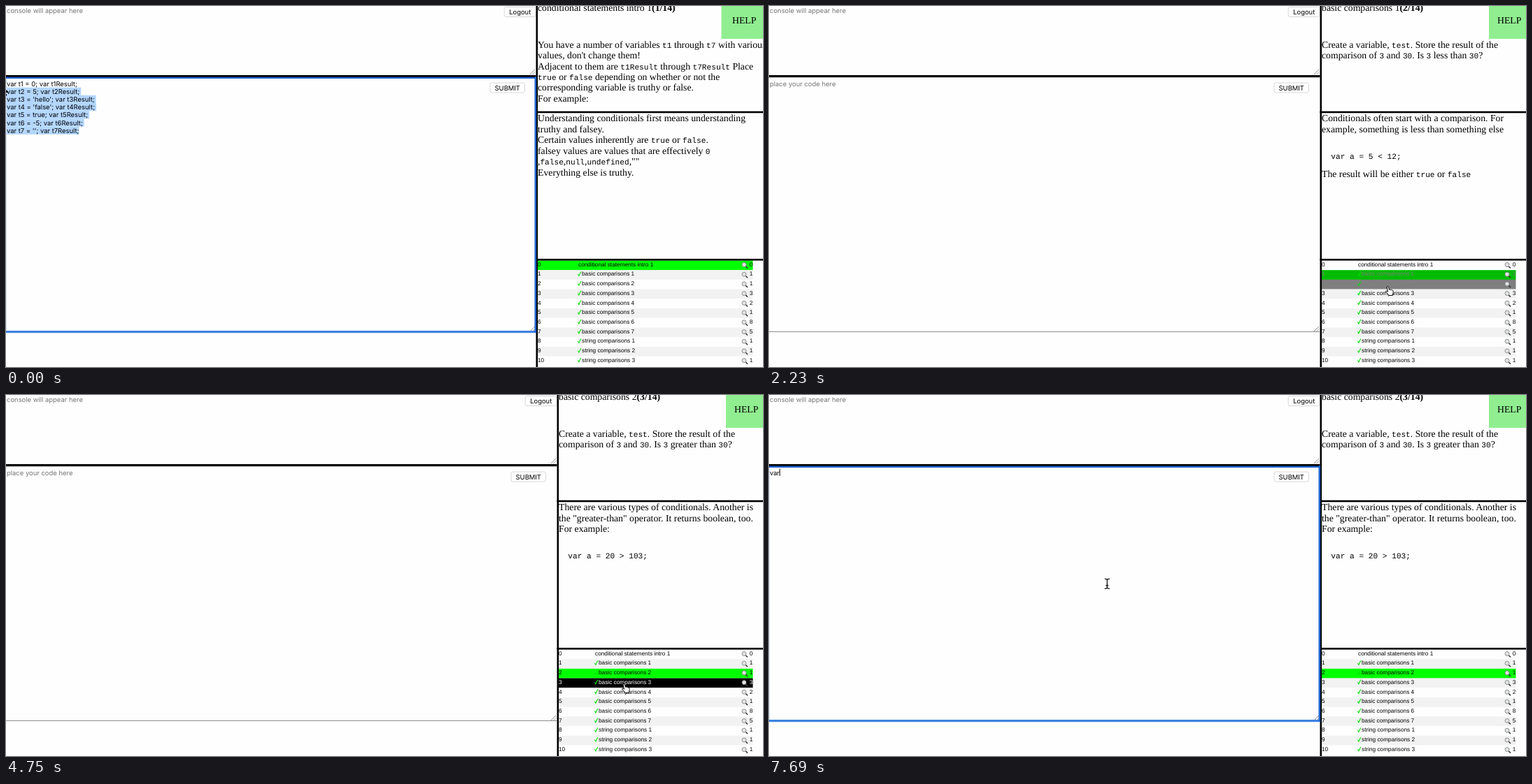
These frames come from a looping animation (1082x517 px, 7990 ms). An HTML page with a canvas:

```html
<!DOCTYPE html>
<html lang="en">
<head>
<meta charset="utf-8">
<title>Code lessons</title>
<style>
html, body { margin: 0; width: 100%; height: 100%; overflow: hidden; background: #fefefe; }
canvas { display: block; width: 1082px; height: 517px; }
</style>
</head>
<body>
<canvas width="1082" height="517"></canvas>
<script>
const ctx = document.querySelector('canvas').getContext('2d');
const LOOP = 7990;
const UI = '9.45px Inter, sans-serif';
const SERIF = '13.75px "Liberation Serif", serif';
const BOLD = 'bold ' + SERIF;
const MONO = '11.15px "Liberation Mono", monospace';
const SANS = '8.25px "Liberation Sans", sans-serif';
const PAPER = '#fefefe';

// Moments at which the screen refreshes
const TICKS = [0, 150, 300, 750, 890, 1040, 1190, 1340, 1490, 1640, 1780, 1930, 2080, 2230, 2380, 2520,
  2820, 2960, 3110, 3550, 3700, 4300, 4450, 4600, 4750, 4900, 5050, 5190,
  5480, 5630, 5780, 5930, 6070, 6220, 6360, 6510, 6660, 6800, 7250, 7390, 7690];

const CODE = [
  'var t1 = 0; var t1Result;', 'var t2 = 5; var t2Result;',
  "var t3 = 'hello'; var t3Result;", "var t4 = 'false'; var t4Result;",
  'var t5 = true; var t5Result;', 'var t6 = -5; var t6Result;', "var t7 = ''; var t7Result;"
];

// Backticks switch to monospace; "code" lines are indented listings
const PAGES = [
  { title: 'conditional statements intro 1', step: '(1/14)',
    task: ['You have a number of variables `t1` through `t7` with various', "values, don't change them!",
      'Adjacent to them are `t1Result` through `t7Result` Place',
      '`true` or `false` depending on whether or not the',
      'corresponding variable is truthy or false.', 'For example:'],
    notes: ['Understanding conditionals first means understanding', 'truthy and falsey.',
      'Certain values inherently are `true` or `false`.',
      'falsey values are values that are effectively `0`',
      ',`false`,`null`,`undefined`,""', 'Everything else is truthy.'] },
  { title: 'basic comparisons 1', step: '(2/14)',
    task: ['Create a variable, `test`. Store the result of the',
      'comparison of `3` and `30`. Is `3` less than `30`?'],
    notes: ['Conditionals often start with a comparison. For', 'example, something is less than something else'],
    code: ['var a = 5 < 12;'], codeY: 219, after: 'The result will be either `true` or `false`' },
  { title: 'basic comparisons 2', step: '(3/14)',
    task: ['Create a variable, `test`. Store the result of the',
      'comparison of `3` and `30`. Is `3` greater than `30`?'],
    notes: ['There are various types of conditionals. Another is',
      'the "greater-than" operator. It returns boolean, too.', 'For example:'],
    code: ['var a = 20 > 103;'], codeY: 234.3 },
  { title: 'basic comparisons 3', step: '(4/14)',
    task: ['Create a variable, `test`. Store the result of the',
      'comparison of `12` and `4`. Is `12` greater than or equal to', '`4`?'],
    notes: ['Sometimes it is necessary to see if something is less', 'or equal to, or greater than or equal to'],
    code: ['var a = 40 <= 40; //true', 'var b = 30 >= 29; //true', 'var c = 30 <= -2; //false'], codeY: 219 }
];
const PAGE_AT = [[0, 0], [1930, 1], [2820, 2], [4900, 3], [6070, 2]];

const COUNTS = [0, 1, 1, 3, 2, 1, 8, 5, 1, 1, 1];
const lessonName = i => i === 0 ? PAGES[0].title
  : i < 8 ? `basic comparisons ${i}` : `string comparisons ${i - 7}`;

// Row looks as [r, g, b, text grey]; each change fades over FADE ms
const FADE = 300;
const LOOK = { hover: [0, 0, 0, 255], active: [0, 255, 0, 0], both: [0, 128, 0, 255] };
const ROW_STATES = {
  0: [[-999, 'active'], [1800, 'rest']],
  1: [[-999, 'rest'], [1409, 'hover'], [1800, 'both'], [2080, 'active'], [2740, 'rest']],
  2: [[-999, 'rest'], [1110, 'hover'], [1409, 'rest'], [2080, 'hover'], [2740, 'both'], [4260, 'active'],
    [4850, 'rest'], [5585, 'hover'], [6010, 'both'], [6440, 'active']],
  3: [[-999, 'rest'], [4260, 'hover'], [4850, 'both'], [5585, 'active'], [6010, 'rest']]
};

const POINTER = [
  [0, 'arrow', -5.5, 114.5], [150, 'beam', 560, 266], [750, 'beam', 600, 285], [890, 'beam', 685, 325],
  [1040, 'beam', 775, 350], [1190, 'hand', 850, 396], [1340, 'hand', 878, 395], [1490, 'hand', 887, 387],
  [1640, 'hand', 888, 383], [1930, 'hand', 888, 385], [2080, 'hand', 883, 396], [2230, 'hand', 880.5, 401],
  [3550, 'hand', 880, 403], [3700, 'hand', 879.5, 405], [4300, 'hand', 879.5, 408], [4450, 'hand', 879.5, 411],
  [4600, 'hand', 879.5, 413], [5480, 'hand', 880, 409], [5630, 'hand', 880, 400], [5780, 'hand', 880, 397.5],
  [6360, 'hand', 872, 395], [6510, 'beam', 483.3, 270.3]
];
const HAND = new Path2D('M2.6 1.6C2.8.4 4.4.3 4.8 1.5L6 5.4C6.6 4.7 7.9 4.9 8.2 5.7 8.8 5.1 9.8 5.4 10 6.1 ' +
  '10.8 5.8 11.5 6.3 11.6 7.2 12 9 11.4 10.5 11 11.5L10.8 13.5H5.6C5 12 3.4 10.8 1.6 9 .3 7.8 1.4 6.6 2.6 7.3L4 8.4Z');
const BEAM = new Path2D('M-3.5-7Q0-7 0-5.5 0-7 3.5-7M0-5.5V5.5M-3.5 7Q0 7 0 5.5 0 7 3.5 7M-2 2.5H2');
const ARROW = new Path2D('M0 0V13L3 10.2 5 14.5 7 13.5 5 9.4H9.4Z');
const CHECK = new Path2D('M.4 4.6L1.9 7 4.8 1');

const latest = (table, t) => table.filter(row => row[0] <= t).pop();
const within = (t, from, to) => t >= from && t < to;

function box(color, x, y, w, h) {
  ctx.fillStyle = color;
  ctx.fillRect(x, y, w, h);
}

function text(str, x, y, font, color = '#000', align = 'left') {
  ctx.font = font;
  ctx.fillStyle = color;
  ctx.textAlign = align;
  ctx.fillText(str, x, y);
  return ctx.measureText(str).width;
}

function line(color, width, ...points) {
  ctx.strokeStyle = color;
  ctx.lineWidth = width;
  ctx.beginPath();
  points.forEach(([x, y]) => ctx.lineTo(x, y));
  ctx.stroke();
}

function rich(str, x, y) {
  str.split('`').forEach((part, i) => { x += text(part, x, y, i % 2 ? MONO : SERIF); });
}

function at(x, y, draw) {
  ctx.save();
  ctx.translate(x, y);
  draw();
  ctx.restore();
}

function button(label, x, y, w) {
  ctx.beginPath();
  ctx.roundRect(x, y, w, 14, 2.5);
  ctx.fillStyle = '#fff';
  ctx.fill();
  ctx.strokeStyle = '#d4d4d4';
  ctx.lineWidth = 0.9;
  ctx.stroke();
  text(label, x + w / 2, y + 10.6, UI, '#000', 'center');
}

function grip(x, y) {
  line('#777', 0.8, [x - 7, y], [x, y - 7]);
  line('#777', 0.8, [x - 3.5, y], [x, y - 3.5]);
}

function rowLook(i, t) {
  const shade = i % 2 ? 242 : 254;
  const look = name => LOOK[name] || [shade, shade, shade, 0];
  let [start, name] = [-999, 'rest'], from = look('rest');
  const blend = now => {
    const p = Math.min(1, (now - start) / FADE);
    return look(name).map((v, k) => from[k] + (v - from[k]) * p);
  };
  for (const [time, next] of ROW_STATES[i] || []) {
    if (time > t) break;
    from = blend(time);
    [start, name] = [time, next];
  }
  return blend(t).map(Math.round);
}

function magnifier(x, y) {
  line('#333', 1.5, [x + 2.2, y + 2.2], [x + 5, y + 5]);
  ctx.beginPath();
  ctx.arc(x, y, 3, 0, 7);
  ctx.fillStyle = '#dfe3e6';
  ctx.fill();
  ctx.strokeStyle = '#888';
  ctx.lineWidth = 0.9;
  ctx.stroke();
}

function lessonRow(i, t, left, nameX) {
  const top = 364.5 + 13.72 * i, base = top + 8.2;
  const [r, g, b, grey] = rowLook(i, t);
  const ink = `rgb(${grey},${grey},${grey})`;
  box(`rgb(${r},${g},${b})`, left, top, 1067.5 - left, 13.72);
  text(i, left, base, SANS, ink);
  if (i) at(nameX - 1, base - 7, () => {
    ctx.strokeStyle = '#00e000';
    ctx.lineWidth = 1.1;
    ctx.stroke(CHECK);
  });
  text(lessonName(i), i ? nameX + 5 : nameX, base, SANS, ink);
  magnifier(1055, top + 6);
  text(COUNTS[i], 1067.3, base, SANS, ink, 'right');
}

function lessonPane(t, page, wide) {
  const left = wide ? 790 : 760;
  text(page.step, left + text(page.title, left, 6.5, SERIF), 6.5, BOLD);
  box('#90ee90', wide ? 1029 : 1022.5, 0, 60, 47);
  text('HELP', wide ? 1041 : 1038, 25, SERIF);
  page.task.forEach((str, i) => rich(str, left, 59.6 + 15.45 * i));
  page.notes.forEach((str, i) => rich(str, left, 165.3 + 15.45 * i));
  (page.code || []).forEach((str, i) => text(str, left + 13.3, page.codeY + 12.9 * i, MONO));
  if (page.after) rich(page.after, left, 244.5);
  COUNTS.forEach((_, i) => lessonRow(i, t, left, wide ? 842 : 818));
  box('#000', left - 2.5, 150.7, 330, 2.6);
  box('#000', left - 2.5, 362, 330, 2.6);
}

function editorText(t, wide) {
  if (!wide) {
    ctx.font = UI;
    CODE.forEach((str, i) => {
      if (t < 300 && i) {
        const end = ctx.measureText(str).width + (i < 6 ? 2 : 0);
        box('#b3d7ff', 1, 105.4 + 11.2 * i, end, 11.3);
      }
    });
    CODE.forEach((str, i) => text(str, 1, 114.6 + 11.2 * i, UI));
    if (within(t, 300, 750) || within(t, 1190, 1490)) box('#000', 105, 172.5, 0.9, 11);
    return;
  }
  const typed = t >= 7690 ? 'var' : t >= 7390 ? 'v' : '';
  const width = typed ? text(typed, 1, 114.6, UI) : 0;
  if (!typed) text('place your code here', 1, 114.6, UI, '#757575');
  if (within(t, 6660, 7250) || typed) box('#000', 1 + width, 105.5, 0.9, 10.5);
}

function workPane(t, wide) {
  const edge = wide ? 787.5 : 757.5;
  const focused = t < 1780 || t >= 6660;
  text('console will appear here', 1, 10.2, UI, '#757575');
  grip(edge - 1.5, 98);
  grip(edge - 1.5, 466);
  editorText(t, wide);
  button('Logout', edge - 45.3, 1.5, 45);
  button('SUBMIT', edge - 65.5, 110, 49.5);
  box('#000', 0, 99, edge, 3.2);
  box('#000', edge, 0, 2.6, 517);
  if (focused) {
    box('#cfe0fa', 0, 103, 0.9, 362);
    box('#1f62cc', 0, 101.6, edge + 0.6, 2.4);
    box('#3f82e2', 0, 465, edge + 0.6, 3.2);
    box('#1f62cc', edge - 2, 101.6, 2.6, 366.4);
  } else {
    box('#8c8c8c', 0, 466, edge, 1);
  }
}

function pointer(t) {
  const [, kind, x, y] = latest(POINTER, t);
  at(x, y, () => {
    ctx.lineJoin = 'round';
    ctx.strokeStyle = '#000';
    ctx.fillStyle = kind === 'hand' ? '#fff' : '#000';
    ctx.lineWidth = kind === 'beam' ? 1.2 : 1;
    if (kind === 'beam') return ctx.stroke(BEAM);
    const shape = kind === 'hand' ? HAND : ARROW;
    ctx.fill(shape);
    if (kind === 'hand') ctx.stroke(shape);
  });
}

function draw(time) {
  const t = TICKS.filter(tick => tick <= time).pop();
  const wide = t >= 1930;
  ctx.textRendering = 'geometricPrecision';
  box(PAPER, 0, 0, 1082, 517);
  lessonPane(t, PAGES[latest(PAGE_AT, t)[1]], wide);
  workPane(t, wide);
  pointer(t);
}

const begin = performance.now();
function loop() {
  draw((performance.now() - begin) % LOOP);
  requestAnimationFrame(loop);
}
loop();
</script>
</body>
</html>
```
